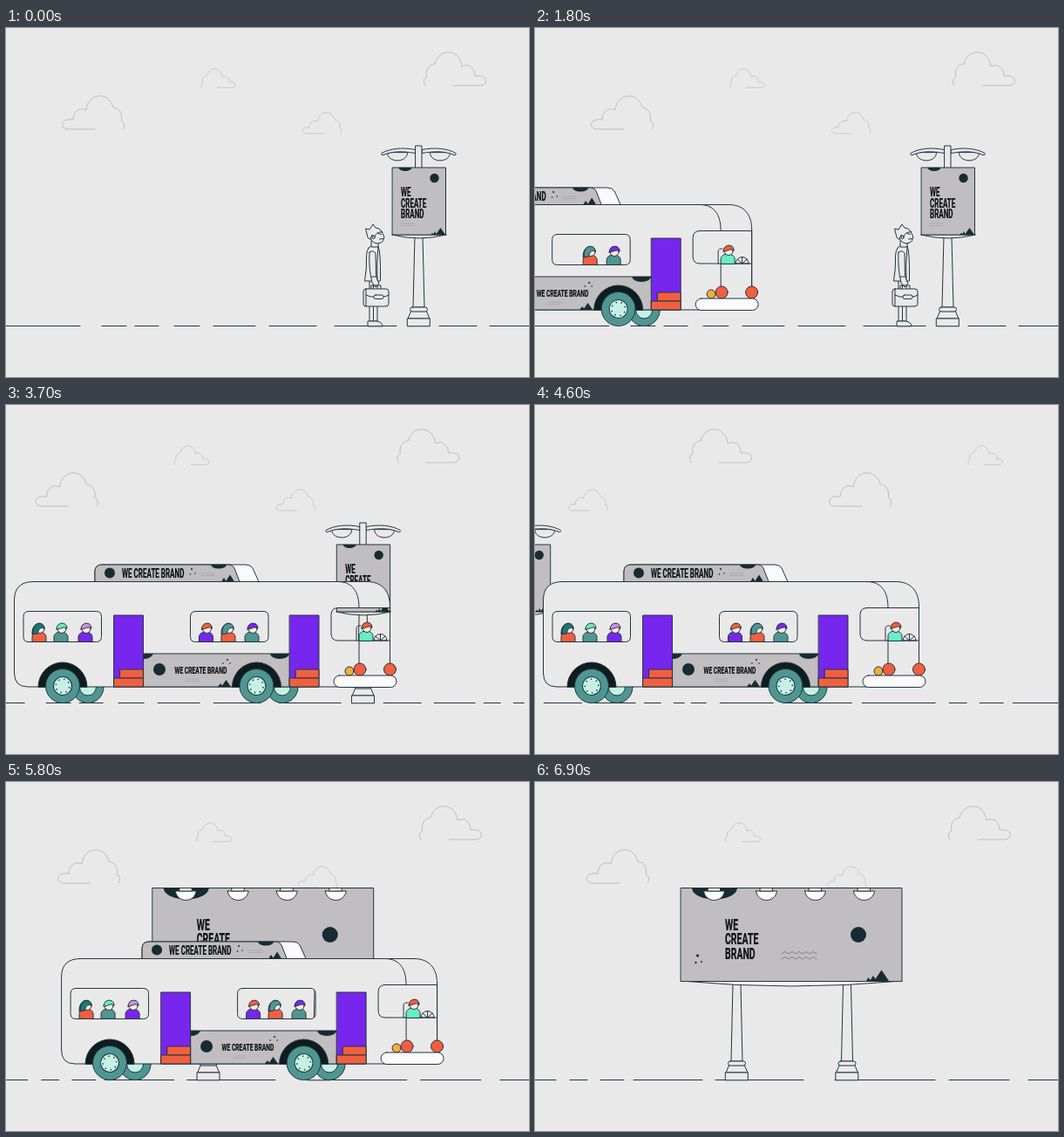
An HTML page for the animation above (7000 ms loop, 600 by 400 pixels).

```html
<!DOCTYPE html>
<html lang="en">
<head>
<meta charset="utf-8">
<title>Bus stop</title>
<style>
  html, body { margin: 0; width: 100%; height: 100%; overflow: hidden; background: #eae9ea; }
  svg { display: block; width: 600px; height: 400px; }
  text { font-family: Roboto, "Liberation Sans", sans-serif; font-weight: 700; fill: #0c1214; stroke: #0c1214; stroke-width: .25; }
  .thin { stroke: #a3a3a6; stroke-width: .7; fill: none; }
</style>
</head>
<body>
<svg id="stage" viewBox="0 0 600 400" stroke-linejoin="round" stroke-linecap="round"></svg>
<script>
const INK = '#22363c', DARK = '#172b32', BLACK = '#0f1c20', BG = '#eae9ea', GREY = '#c0bec0', WHITE = '#fafafa';
const RED = '#f15f41', TEAL = '#4f9692', MINT = '#68eec4', PURPLE = '#7726ee';
const SKIN = '#fbe9df', PINK = '#cf8fe2', PINE = '#1f7572', HUB = '#c6f0e6';
const CONDENSE = 0.57;

const path = (d, fill = 'none', extra = '') => `<path d="${d}" fill="${fill}" ${extra}/>`;
const rect = (x, y, w, h, fill = BG, r = 0) => `<rect x="${x}" y="${y}" width="${w}" height="${h}" rx="${r}" fill="${fill}"/>`;
const disc = (x, y, r, fill, extra = '') => `<circle cx="${x}" cy="${y}" r="${r}" fill="${fill}" ${extra}/>`;
const group = (id, body) => `<g id="${id}">${body}</g>`;
const words = (x, y, size, s) => `<text transform="translate(${x} ${y}) scale(${CONDENSE} 1)" font-size="${size}">${s}</text>`;
const stack = (x, y, size, gap) => ['WE', 'CREATE', 'BRAND'].map((s, i) => words(x, y + i * gap, size, s)).join('');
const dot = (x, y, r) => disc(x, y, r, DARK, 'stroke="none"');
const peak = (x, y, w, h) => path(`M${x} ${y}l${w / 2} ${-h}l${w / 2} ${h}z`, DARK, 'stroke="none"');
const bowl = (x, y, rx, ry) => path(`M${x - rx} ${y}a${rx} ${ry} 0 0 0 ${2 * rx} 0z`, DARK, 'stroke="none"');
const gem = (x, y, r) => path(`M${x} ${y - r}l${r} ${r}l${-r} ${r}l${-r} ${-r}z`, DARK, 'stroke="none"');
const lines = (x, y, w) => path(`M${x} ${y}h${w}m${-w} 2.5h${w}`, 'none', 'class="thin"');
const wave = (x, y, n, s) => path(`M${x} ${y}` + `l${s} -2.6l${s} 2.6`.repeat(n), 'none', 'stroke="#707578" stroke-width=".8"');

// Scenery
const CLOUD = 'M38 38H6C-3 36-1 25 13 27C13 18 20 12 28 16C30-4 54-6 59 13C67 14 70 22 68 28C73 30 72 35 70 38';
const CLOUDS = [[64, 78, 1, 0], [224, 47, .56, 1], [340, 97, .63, 0], [480, 28, 1, 1]];
const cloud = ([x, y, s, flip]) =>
  path(CLOUD, 'none', `transform="translate(${x + (flip ? 71 * s : 0)} ${y}) scale(${flip ? -s : s} ${s})" stroke="${s < 1 ? '#c4c4c6' : '#b6b8b9'}" stroke-width="${.9 / s}"`);
const cloudRow = CLOUDS.map(cloud).join('');
const clouds = cloudRow + `<g transform="translate(575 0)">${cloudRow}</g>`;

const DASHES = [0, 85, 110, 138, 148, 175, 193, 222, 238, 286, 302, 356, 377, 448, 461, 486, 497, 540, 555, 602,
  612, 631, 646, 658, 666, 683, 699, 760, 772, 850, 862, 946, 962, 982, 997, 1024, 1035, 1114, 1129, 1230,
  1266, 1381, 1397, 1466, 1488, 1540];
let ground = '';
for (let i = 0; i < DASHES.length; i += 2) ground += `M${DASHES[i]} 341.5H${DASHES[i + 1]}`;

const pole = (x, top) =>
  path(`M${x - 4.5} ${top}L${x - 6.5} 320H${x + 6.5}L${x + 4.5} ${top}z`, BG) +
  path(`M${x - 9} 325L${x - 12.5} 333H${x + 12.5}L${x + 9} 325z`, BG) +
  rect(x - 10, 320, 20, 5, BG, 2.5) + rect(x - 12.8, 333, 25.6, 8.8);

const arm = side => `<g transform="translate(473.5 0) scale(${side} 1)">` +
  path('M13 143C13 155 36 155 36 143z', BG) +
  path('M4 139.5C18 136.5 33 138 42.5 143.5C43.5 145 42 146 40.5 145.5C30 141 18 141 4 143.5z', BG) + '</g>';

const sign = pole(473.5, 239) + arm(-1) + arm(1) + rect(470, 135, 7, 26) +
  path('M443 237Q474 245 505 237z', BG) + rect(443.5, 160, 61, 77, GREY) +
  bowl(458, 160, 7.5, 4) + dot(491.5, 172, 5.2) + stack(453, 193, 14.1, 12.5) + lines(453, 224, 15) +
  peak(493, 237, 11, 8) + peak(490, 237, 4, 4) + peak(487.5, 237, 3, 2.5);

const spot = x => path(`M${x - 12} 125H${x + 12}C${x + 10} 139 ${x - 10} 139 ${x - 12} 125z`, WHITE) +
  rect(x - 7, 121.5, 14, 3.5, WHITE);
const board = pole(231.5, 232) + pole(358, 232) +
  path('M167.5 228Q294 240 421 228z', WHITE) + rect(167.5, 121.5, 253.5, 107, GREY) +
  bowl(206, 121.5, 26, 13) + [205.5, 265.5, 321.5, 377.5].map(spot).join('') +
  stack(218, 169.5, 18.4, 16.5) + dot(371, 175, 9) + wave(283, 197, 5, 4) + wave(283, 203, 5, 4) +
  gem(186.5, 199, 2) + gem(184.5, 207, 1.4) + gem(191, 206, 1.2) +
  peak(389, 228, 17, 12.5) + peak(384, 228, 8, 6) + peak(380, 228, 5, 4);

// Bus
const person = (x, y, coat, hair, long) =>
  (long ? path(`M${x - 8} ${y - 8}C${x - 9} ${y - 23} ${x + 5} ${y - 24} ${x + 6} ${y - 15}L${x} ${y - 8}z`, hair) : '') +
  path(`M${x - 8} ${y}V${y - 5}C${x - 8} ${y - 13} ${x + 8} ${y - 13} ${x + 8} ${y - 5}V${y}z`, coat) +
  disc(x + 1, y - 14.5, 5, SKIN) +
  path(long ? `M${x - 7} ${y - 9}C${x - 8} ${y - 24} ${x + 6} ${y - 23} ${x + 6} ${y - 15}C${x + 1} ${y - 17} ${x} ${y - 14} ${x - 2} ${y - 9}z`
            : `M${x - 5} ${y - 14}C${x - 5} ${y - 23} ${x + 7} ${y - 23} ${x + 7} ${y - 15}C${x + 3} ${y - 18} ${x} ${y - 14} ${x - 5} ${y - 14}z`, hair);

const wheel = (x, y) => disc(x, y, 19.5, TEAL) +
  `<g class="hub" data-at="${x} ${y}">` + disc(x, y, 10.5, HUB) +
  disc(x, y, 7.8, 'none', 'stroke-dasharray="1.4 4.73" stroke-width="1.6" stroke-linecap="butt"') + '</g>';
const farWheel = x => disc(x, 323.5, 18, TEAL) + disc(x, 323.5, 9.5, HUB);
const arch = x => path(`M${x - 28} 323a28 28 0 0 1 56 0z`, BLACK);
const door = x => rect(x, 241, 33.5, 82, PURPLE) + rect(x + 7, 303, 26.5, 10, RED) + rect(x, 313, 33.5, 10, RED);
const pane = (x, w) => `M${x + 6} 236.5h${w - 12}q6 0 6 6v23q0 6-6 6h${12 - w}q-6 0-6-6v-23q0-6 6-6z`;
const SHELL = 'M31 202.5H414C431 202.5 440.5 213 440.5 231V323H25Q9.5 323 9.5 307V224Q9.5 202.5 31 202.5z';
const CAB = 'M381 232.5H440.5V270H381Q373 270 373 262V240.5Q373 232.5 381 232.5z';

const roof = path('M102 202.5V191Q102 183 110 183H275Q281 183 283 187L290 202.5z', WHITE) +
  path('M102 202.5V191Q102 183 110 183H256Q260 183 262 187L268 202.5z', GREY) +
  bowl(244, 183, 9, 4.5) + dot(119, 192.5, 6) + words(133, 197.5, 14.1, 'WE CREATE BRAND') +
  gem(213, 188, 1.3) + gem(211.5, 194, 1) + gem(217, 193, .9) + lines(224, 193, 15) +
  peak(252, 202.5, 10, 8) + peak(247, 202.5, 6, 4.5);

const banner = rect(158, 285, 168, 38, GREY) + bowl(314, 285, 11, 6) +
  dot(176, 303, 7) + words(193.5, 307.5, 11.8, 'WE CREATE BRAND') + lines(207, 314, 14) +
  path('M158 285H169Q166 291 158 291z', DARK, 'stroke="none"') +
  gem(254, 292, 1.3) + gem(249, 296, 1) + gem(257, 296, .9) + peak(247, 323, 11, 8) + peak(243, 323, 6, 4);

const cab = path('M382 202.5C397 203 405 213 405 232.5M405 270V297M440.5 270V297') +
  path('M402 270V256Q402 252.5 407 253') + person(413, 270, MINT, RED) +
  path('M422 270a7.5 7.5 0 0 1 15 0M429.5 270V262.5M429.5 270L424 265M429.5 270L435 265M422 270H437') +
  disc(394, 305, 5, '#f3ae3d') + disc(406, 303, 7, RED) + disc(440.5, 303, 7, RED) +
  rect(376, 310, 72, 13.5, WHITE, 6.7);

const bus = farWheel(94) + farWheel(317) + roof +
  path(SHELL + pane(20, 89.5) + pane(211.5, 89.5) + CAB, BG, 'fill-rule="evenodd"') +
  person(38, 271, RED, PINE, 1) + person(63, 271, TEAL, MINT) + person(91, 271, PURPLE, PINK) +
  group('rider', person(229.5, 271, PURPLE, RED)) + person(255, 271, RED, TEAL, 1) + person(282, 271, TEAL, PURPLE) +
  banner + door(124) + door(325.5) + arch(65) + arch(287.5) + wheel(65, 322) + wheel(287.5, 322) + cab;

// Waiting man
const man =
  path('M417 288V336H426V288z', BG) + path('M421.5 292V336') +
  path('M415 341.5V336H425Q432 337 432 341.5z', BG) +
  path('M416 252Q421 247 427 250Q430 256 429.5 290H411.5Q414 276 413.5 262Q413.5 255 416 252z', BG) +
  path('M427 251Q425 270 426 290') +
  path('M419 244V251H427V245z', BG) +
  path('M417 234Q417 246 426 247Q433 246 433 242L434 240L432.5 236L430 232z', BG) +
  path('M415 240L412.5 230L417 231L421 225L424 229L428 230L432 234Q425 233 423 239L420 237L418 242z', BG) +
  path('M427 235.5l3.5 1M428.5 242l4-.5') + disc(421.5, 240, 1.6, BG) +
  path('M417 257Q421 254 424 258L424.5 283Q426 290 428 293L424 297L420 292Q416 276 417 257z', BG) +
  path('M419 285h6') +
  path('M419 299V295H430V299') + rect(410, 299, 29, 20, BG, 3) + path('M413 299V319M413 306Q420 309 422 308M433 308Q436 308 439 306') +
  rect(422, 306, 11, 4.5, BG, 2);

const stage = document.getElementById('stage');
stage.innerHTML = group('clouds', clouds) +
  `<g stroke="${INK}" stroke-width="1">` +
  group('world', path(ground) + sign + `<g transform="translate(922 0)">${board}</g>`) +
  group('bus', bus) + group('man', man) + '</g>';

const find = id => document.getElementById(id);
const [cloudsEl, worldEl, busEl, manEl, riderEl] = ['clouds', 'world', 'bus', 'man', 'rider'].map(find);
const hubs = [...document.querySelectorAll('.hub')];

const LOOP = 7000, STEP = 100;
const ease = (t, start, length) => {
  const u = Math.min(1, Math.max(0, (t - start) / length));
  return (1 - Math.cos(Math.PI * u)) / 2;
};
const slide = (el, x) => el.setAttribute('transform', `translate(${x.toFixed(2)} 0)`);
const show = (el, on) => el.setAttribute('visibility', on ? 'visible' : 'hidden');

function draw(t) {
  const scroll = 922 * ease(t, 3262, 2584);
  const busX = -460 + 460 * ease(t, 315, 2685) + 610 * ease(t, 5519, 1460);
  const walk = Math.min(1, Math.max(0, (t - 2950) / 450));
  slide(cloudsEl, -580 * ease(t, 3338, 2460));
  slide(worldEl, -scroll);
  slide(busEl, busX);
  slide(manEl, -83 * walk);
  show(manEl, t < 3400);
  show(riderEl, t >= 3400);
  const turn = (busX + scroll) / 19.5 * 180 / Math.PI;
  for (const hub of hubs) hub.setAttribute('transform', `rotate(${turn.toFixed(1)} ${hub.dataset.at})`);
}

const begin = performance.now();
function tick() {
  const t = (performance.now() - begin) % LOOP;
  draw(Math.floor(t / STEP) * STEP);
  requestAnimationFrame(tick);
}
tick();
</script>
</body>
</html>
```
